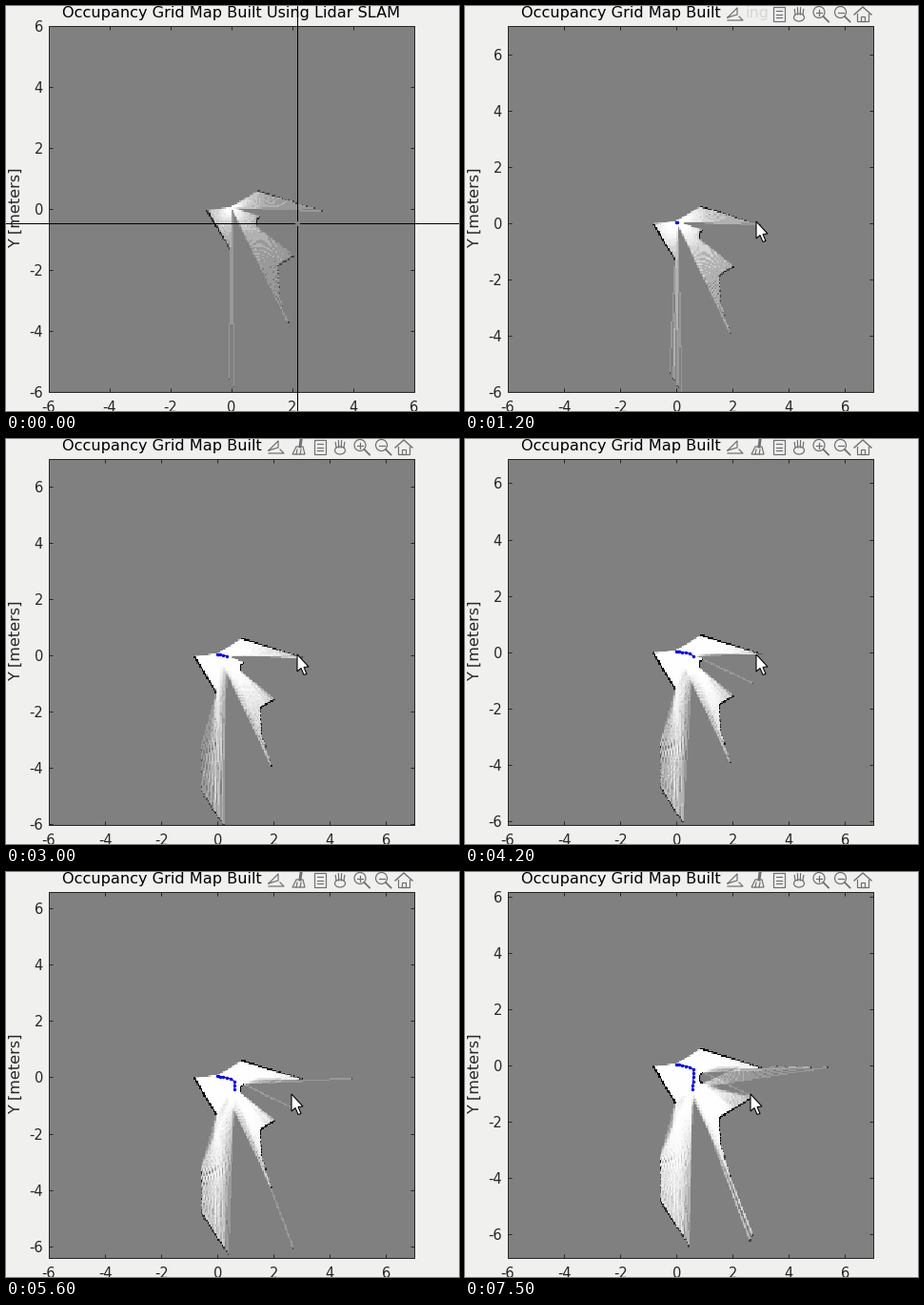
These frames come from a looping animation (476 by 425 pixels, 8000 ms). A matplotlib script:

```python
import numpy as np
import matplotlib.pyplot as plt
from matplotlib.animation import FuncAnimation
from matplotlib.patches import Circle, Ellipse, Polygon, Rectangle

W, H, DPI = 476, 425, 100
PX = 72 / DPI                     # one pixel in points
LEFT, TOP, SIDE = 45, 21, 384
STEP, SCANS = 100, 12
BG, INK, ICON = "#f0f0ee", "#262626", "#707070"
plt.rcParams["font.family"] = "DejaVu Sans"

# ---- robot path: speeds up, heads right, then turns down -------------------
k = np.arange(1, SCANS)
heading = np.radians(-10 - 85 / (1 + np.exp((6.3 - k) / 0.4)))
stride = 0.14 * np.minimum(1, k / 4)
moves = stride[:, None] * np.stack([np.cos(heading), np.sin(heading)], axis=-1)
POSES = np.vstack([(0, 0), np.cumsum(moves, axis=0)]) + (0, 0.04)
# evenly spaced scans, slightly early in the middle of the run
SCAN_TIMES = np.append(0, 1200 + 630 * (k - 1)
                       - 230 * np.sin(np.pi * (k - 1) / 10))

# ---- occupancy grid --------------------------------------------------------
CELL, HALF, REACH, BEAM = 0.05, 7, 6.1, 1.5
N = int(2 * HALF / CELL)
arc = np.radians(np.linspace(105, 255, 8))
PILLAR = np.stack([1 + 0.2 * np.cos(arc), -0.47 + 0.2 * np.sin(arc)], axis=-1)
WALLS = [
    [(-.83, -.04), (-.04, -1.33)],
    [(.87, .58), (3.05, -.1)],
    [(3.3, -.03), (5.42, -.07)],
    [(2.75, -1.1), (1.52, -1.88), (1.57, -2.8), (1.93, -3.95)],
    [(2.85, -5.8), (2.55, -6.3)],
    [(-.6, -3.3), (-.58, -4.8), (.5, -6.5)],
    PILLAR,
]
START = np.array([a for w in WALLS for a in w[:-1]])
EDGE = np.array([b for w in WALLS for b in w[1:]]) - START


def cross(a, b):
    return a[..., 0] * b[..., 1] - a[..., 1] * b[..., 0]


def cell_of(points):
    ij = np.floor((points + HALF) / CELL).astype(int).clip(0, N - 1)
    return ij[..., 1] * N + ij[..., 0]


def count(cells):
    return np.bincount(cells, minlength=N * N).reshape(N, N)


def scan(pose, offset):
    """Log-odds change from one sweep; rays without an echo are dropped."""
    angle = np.radians(np.arange(0, 360, BEAM) + offset)
    d = np.stack([np.cos(angle), np.sin(angle)], axis=-1)
    rel, det = START - pose, cross(d[:, None], EDGE)
    t = cross(rel, EDGE) / det
    u = cross(rel, d[:, None]) / det
    dist = np.where((t > 0) & (u >= 0) & (u <= 1), t, np.inf).min(axis=1)
    d, dist = d[dist < REACH], dist[dist < REACH]
    s = np.arange(0, REACH, 0.02)
    cells = cell_of(pose + d[:, None] * s[:, None])
    keys = cells + N * N * np.arange(len(d))[:, None]
    free = np.unique(keys[s < dist[:, None] - CELL]) % (N * N)
    hits = cell_of(pose + d * dist[:, None])
    return count(hits) - 0.405 * count(free)


maps, odds = [], np.zeros((N, N))
for i, pose in enumerate(POSES):
    odds = (odds + scan(pose, BEAM / 2 * (i % 2 == 0))).clip(-5, 5)
    maps.append(1 / (1 + np.exp(odds)))

# ---- axes ------------------------------------------------------------------
fig = plt.figure(figsize=(W / DPI, H / DPI), dpi=DPI, facecolor=BG)
ax = fig.add_axes([LEFT / W, 1 - (TOP + SIDE) / H, SIDE / W, SIDE / H])
image = ax.imshow(maps[0], cmap="gray", vmin=0, vmax=1, origin="lower",
                  extent=(-HALF, HALF, -HALF, HALF), aspect="auto",
                  interpolation="nearest")
path, = ax.plot([], [], color="#0000ff", lw=1.2 * PX, marker="o",
                ms=3.4 * PX, mew=0)
ticks = range(-6, 7, 2)
ax.set_xticks(ticks, [str(v) for v in ticks])
ax.set_yticks(ticks, [str(v) for v in ticks])
ax.tick_params(direction="in", length=4 * PX, width=PX, color=INK,
               labelcolor=INK, labelsize=14.6 * PX, top=True, right=True)
ax.tick_params(axis="x", pad=8.5 * PX)
ax.tick_params(axis="y", pad=6 * PX)
for spine in ax.spines.values():
    spine.set(linewidth=PX, color=INK)

# ---- overlay in pixel coordinates ------------------------------------------
top = fig.add_axes([0, 0, 1, 1])
top.set(xlim=(0, W), ylim=(H, 0))
top.axis("off")
top.text(237, 12, "Occupancy Grid Map Built Using Lidar SLAM", ha="center",
         va="baseline", fontsize=16.16 * PX, color="black", zorder=1)
top.text(18, 212, "Y [meters]", rotation=90, ha="right", va="center",
         fontsize=16.1 * PX, color=INK)


def stroke(*points, color=ICON, width=1.2):
    xs, ys = zip(*points)
    return top.plot(xs, ys, color=color, lw=width * PX, zorder=4)[0]


def patch(kind, *args, fc="none", ec=ICON, width=1.2, zorder=4, **kw):
    return top.add_patch(kind(*args, fc=fc, ec=ec, lw=width * PX,
                              zorder=zorder, **kw))


def magnifier(x):
    return [patch(Circle, (x, 6.5), 6),
            stroke((x + 4.5, 11), (x + 10, 16.5), width=1.8),
            stroke((x - 3, 6.5), (x + 3, 6.5))]


def hand(x):
    fingers = [stroke((x + dx, 9), (x + 1.2 * dx, 1.5 + dx * dx / 8))
               for dx in np.linspace(-4, 4, 4)]
    return fingers + [patch(Ellipse, (x, 12), 11, 8)]


def page(x):
    return [patch(Rectangle, (x, 1), 12, 15),
            *[stroke((x + 3, y), (x + 9, y)) for y in np.linspace(5, 12, 3)]]


def house(x):
    return [stroke((x - 9, 9), (x, 1), (x + 9, 9), width=1.4),
            stroke((x - 6, 8), (x - 6, 16), (x + 6, 16), (x + 6, 8)),
            patch(Rectangle, (x - 2, 11), 4, 5)]


toolbar = [
    patch(Rectangle, (271.5, 0), 160, 19.5, fc=BG, ec="none", zorder=3),
    stroke((276, 12), (286, 2), (286, 9), (276, 12)),
    stroke((276, 15), (292, 15), (288, 11)),
    *page(324), *hand(351), *magnifier(372), stroke((372, 3.5), (372, 9.5)),
    *magnifier(394.5), *house(418),
]
brush = [stroke((310, 1), (309, 8), width=3),
         patch(Polygon, [(305, 8), (312, 8), (314, 16), (301, 16)]),
         *[stroke((x + 1, 11), (x, 16)) for x in (305, 309)]]
ghost = [top.text(295, 12, "ing", va="baseline", fontsize=16.16 * PX,
                  color="#d6d6d4", zorder=4)]

ARROW = np.array([(0, 0), (0, 18), (4, 14.5), (7, 21.5), (10, 20.5),
                  (7, 13.5), (12, 13)])
pointer = patch(Polygon, ARROW, fc="white", ec="black", width=1.1, zorder=6)
HAIR_Y, GAP = 227.5, 3
vertical = [stroke((0, a), (0, b), color="black", width=1)
            for a, b in ((0, HAIR_Y - GAP), (HAIR_Y + GAP, H))]
horizontal = [stroke((a, HAIR_Y), (b, HAIR_Y), color="black", width=1)
              for a, b in ((0, 306 - GAP), (306 + GAP, W))]


def show(parts, on):
    for part in parts:
        part.set_visible(on)


def smooth(t, start, end):
    u = np.clip((t - start) / (end - start), 0, 1)
    return u * u * (3 - 2 * u)


def draw(frame):
    t = frame * STEP
    last = np.sum(t >= SCAN_TIMES) - 1
    limit = 6 if last == 0 else 7
    follow = min(0, POSES[last, 1])      # the view sinks with the robot
    ax.set_xlim(-6, limit)
    ax.set_ylim(follow - 6, follow + limit)
    image.set_data(maps[last])
    path.set_data(*POSES[:last + 1].T)
    path.set_visible(last > 0)

    for line in vertical:
        line.set_xdata([305.5 + (t >= 300)] * 2)
    show(vertical + horizontal, t < 800)
    show([pointer], t >= 800)
    show(toolbar, t >= 900)
    show(ghost, 900 <= t < 1700)
    show(brush, t >= 1700)
    pointer.set_xy(ARROW + (306, 226) + smooth(t, 4600, 5200) * np.array([-6, 7]))
    return []


anim = FuncAnimation(fig, draw, frames=80, interval=STEP, repeat=True,
                     repeat_delay=0, blit=False)
plt.show()
```
